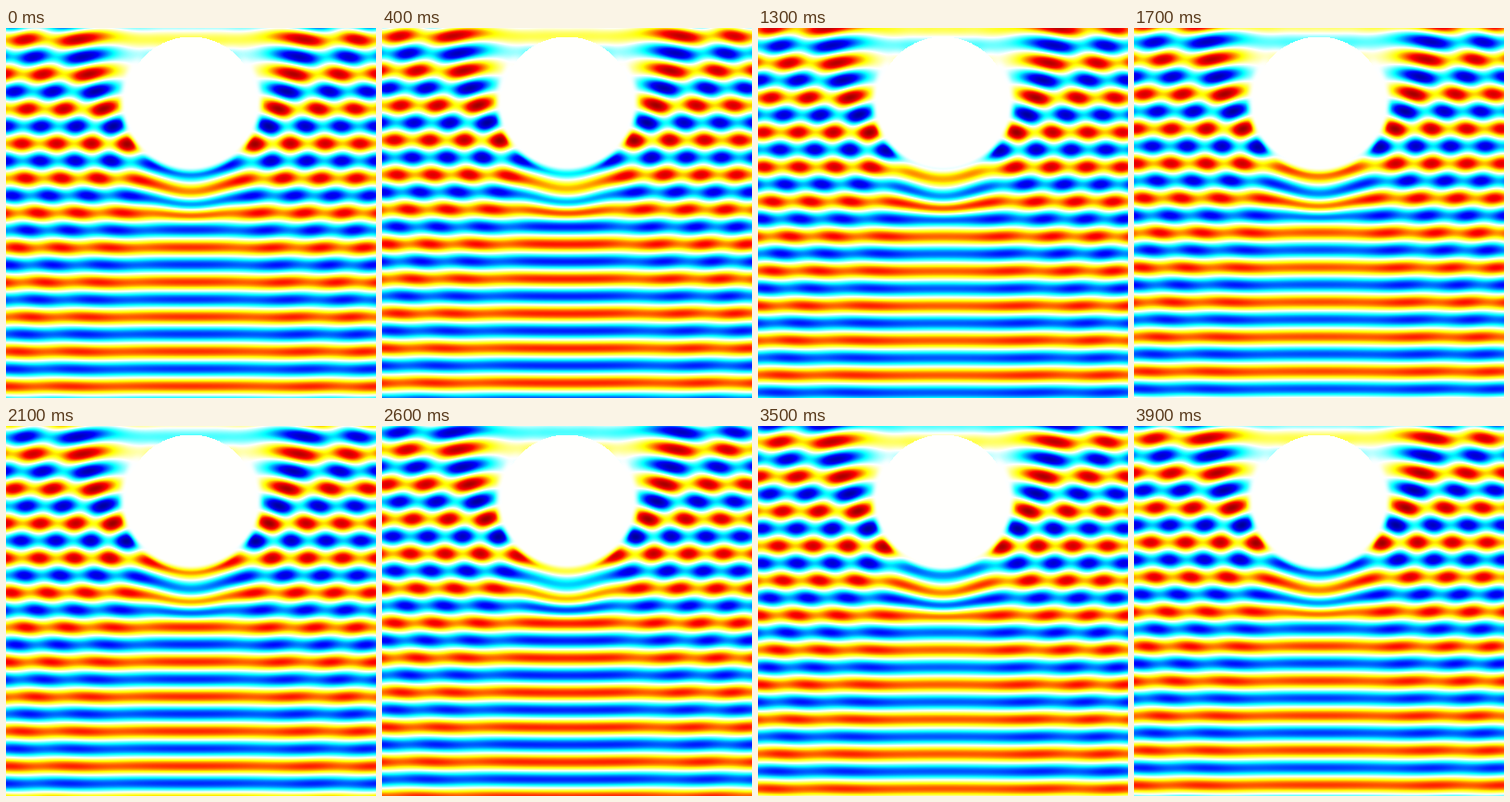
These frames come from a looping animation (400x400 px, 4 s). A matplotlib script:

```python
import numpy as np
import matplotlib.pyplot as plt
from matplotlib.animation import FuncAnimation
from matplotlib.colors import LinearSegmentedColormap

SIZE, FRAMES, INTERVAL = 400, 40, 100
WAVELEN = 37.5
K = 2 * np.pi / WAVELEN
CX, CY, RADIUS = 199.5, 79.0, 70.0
CREST = 387.0            # y of a wave crest at time zero
ORDERS = 26
VMAX = 1.7


def hankel(x, count):
    """Outgoing Hankel functions of order 0..count for x well above 1."""
    out = []
    for m in (0, 1):
        term, total = np.ones_like(x, dtype=complex), 0
        for j in range(1, 18):
            total = total + term
            term = term * 1j * (4 * m * m - (2 * j - 1) ** 2) / (8 * j * x)
        phase = x - m * np.pi / 2 - np.pi / 4
        out.append(np.sqrt(2 / (np.pi * x)) * np.exp(1j * phase) * total)
    for m in range(1, count):
        out.append(2 * m / x * out[m] - out[m - 1])
    return out


def slope(values, x):
    """Derivatives of cylinder functions from their neighbours in order."""
    first = [-values[1]]
    rest = [values[m - 1] - m / x * values[m] for m in range(1, len(values))]
    return np.array(first + rest)


def smooth(t):
    t = np.clip(t, 0, 1)
    return t * t * (3 - 2 * t)


def scatter_weights():
    """Coated disk: dark head on, mirror-like at grazing incidence."""
    ka = K * RADIUS
    h = np.array(hankel(np.array(ka), ORDERS))
    j = h.real
    m = np.arange(ORDERS + 1)
    s = np.minimum(m / ka, 0.999)
    mirror = -s * np.exp(0.8j * (1 - s))
    load = -1j * np.sqrt(1 - s ** 2) * (1 - mirror) / (1 + mirror) - 0.5 / ka
    coef = -(slope(j, ka) - load * j) / (slope(h, ka) - load * h)
    return coef * np.where(m == 0, 1, 2) * 1j ** m


def solve_field():
    y, x = np.mgrid[0:SIZE, 0:SIZE] + 0.0
    dx, up = x - CX, CY - y
    r = np.hypot(dx, up)
    cos_phi = up / np.maximum(r, 1e-9)
    phi = np.arccos(cos_phi)

    plane = np.exp(1j * K * up)
    waves = hankel(K * np.maximum(r, RADIUS), ORDERS)
    field = plane + sum(c * w * np.cos(n * phi)
                        for n, (c, w) in enumerate(zip(scatter_weights(), waves)))

    # The coating slows and dims the wave in front of the disk.
    front = smooth((135 - r) / 40) * np.exp(-(dx / 42) ** 2) * (up < 0)
    field *= np.exp(1j * K * 14 * front) * (1 - 0.25 * front)
    field *= smooth((r - RADIUS) / 10)

    # Faint wave creeping round to the far side.
    field += 0.4 * plane * smooth((cos_phi - 0.5) / 0.4)
    field[r < RADIUS] = 0
    return field * np.exp(1j * K * (CREST - CY))


cmap = LinearSegmentedColormap.from_list(
    "waves", ["#000080", "#0000ff", "#00ffff", "#ffffff",
              "#ffff00", "#ff0000", "#800000"], 512)
field = solve_field()

fig = plt.figure(figsize=(4, 4), dpi=100)
ax = fig.add_axes([0, 0, 1, 1])
ax.axis("off")
image = ax.imshow(field.real, cmap=cmap, vmin=-VMAX, vmax=VMAX,
                  interpolation="nearest", aspect="auto")


def draw(frame):
    turn = np.exp(-2j * np.pi * frame / FRAMES)
    image.set_data((field * turn).real)
    return [image]


anim = FuncAnimation(fig, draw, frames=FRAMES, interval=INTERVAL, repeat=True)
plt.show()
```
